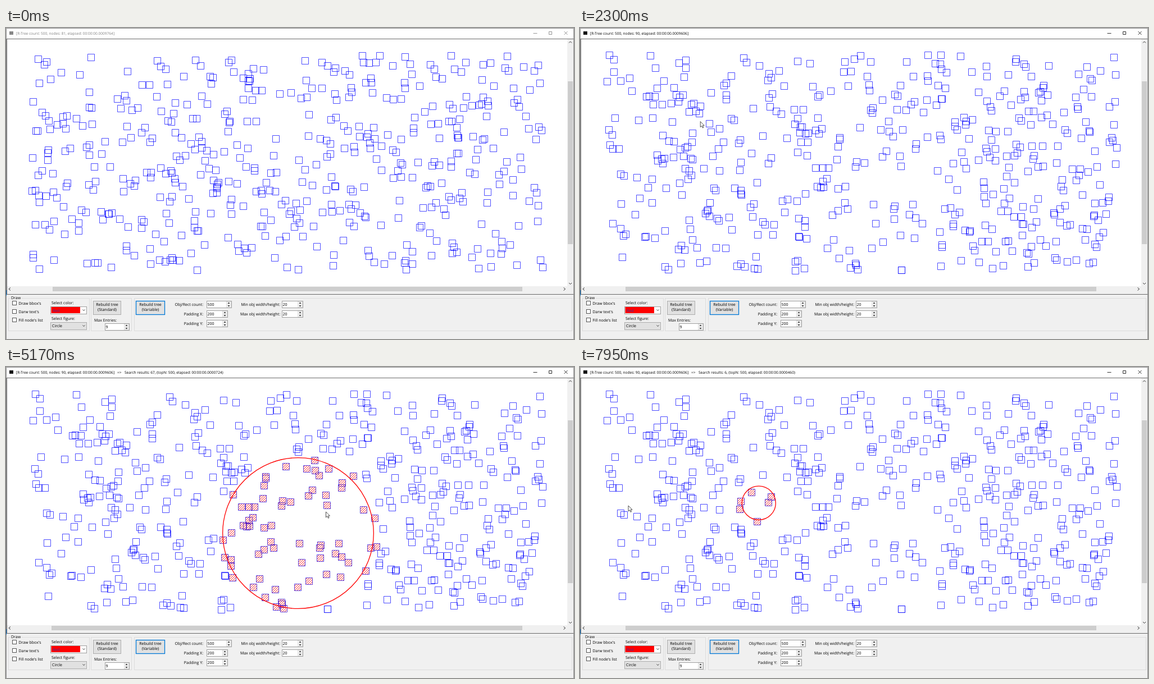
Recreate the animation shown at these times as an HTML page. Size 1011 by 554 pixels, loop 8 s.

```html
<!DOCTYPE html>
<html lang="en">
<head>
<meta charset="utf-8">
<title>R-Tree search</title>
<style>
  html, body { margin: 0; width: 100%; height: 100%; overflow: hidden; background: #f0f0f0; }
  svg { display: block; width: 1011px; height: 554px; }
  text { font: 7px "Open Sans", "Noto Sans", sans-serif; text-rendering: geometricPrecision; white-space: pre; }
  .title text { font-size: 6.57px; }
  .mid { text-anchor: middle; }
  .end { text-anchor: end; }
  .line { fill: none; stroke: #333; }
  .border { fill: none; stroke: #696969; }
  .outer { stroke: #8c8c8c; }
  .check { fill: #fff; stroke: #555; }
  .box { fill: #fff; stroke: #a0a0a0; }
  .group { fill: none; stroke: #dcdcdc; }
  .button { fill: #e1e1e1; stroke: #adadad; }
  #rebuild { stroke: #0078d7; stroke-width: 1.3; }
  .hover #rebuild { fill: #e5f1fb; }
  .off .control text { fill: #a0a0a0; }
  .off .labels text { fill: #666; }
  .off .button, .off #rebuild { fill: #ccc; stroke: #bfbfbf; stroke-width: 1; }
  .off .control .box, .off .check { stroke: #ccc; }
  .inactive { opacity: .5; }
  .squares { fill: none; stroke: #00f; stroke-width: .7; }
  .shape { fill: none; stroke: #f00; stroke-width: 1.3; }
</style>
</head>
<body>
<svg id="stage" viewBox="0 0 1011 554"></svg>
<script>
const LOOP = 8000;
const stage = document.getElementById('stage');

// Interface pieces
const text = (x, y, value, cls = '') => `<text x="${x}" y="${y + 2.6}" class="${cls}">${value}</text>`;
const rect = (x, y, w, h, attrs) => `<rect x="${x}" y="${y}" width="${w}" height="${h}" ${attrs}/>`;
const frame = (x, y, w, h, cls, id = '') => rect(x + .5, y + .5, w, h, `class="${cls}" id="${id}"`);
const path = (d, cls = 'line') => `<path d="${d}" class="${cls}"/>`;
const check = (y, label) => frame(11, y - 4, 7, 7, 'check') + text(22.5, y, label);
const chevron = (x, y) => path(`M${x - 2} ${y - 1}l2 2l2-2`);
const spinner = (x, y, w, value) => frame(x, y, w, 12, 'box') +
  rect(x + w - 8.5, y + 1.5, 8, 10, 'fill="#f0f0f0" stroke="#ccc" stroke-width=".5"') +
  `<path d="M${x + w - 6.5} ${y + 5}h4l-2-2.5zM${x + w - 6.5} ${y + 8}h4l-2 2.5z" fill="#333"/>` +
  text(x + 1.5, y + 6, value);
const field = (right, y, label, x, w, value) => text(right, y + 6, label, 'end') + spinner(x, y, w, value);
const button = (x, y, w, kind, id) => frame(x, y, w, 24, 'button', id) +
  text(x + w / 2 + .5, y + 6.5, 'Rebuild tree', 'mid') + text(x + w / 2 + .5, y + 15.5, `(${kind})`, 'mid');

stage.innerHTML = `
<defs><pattern id="hatch" width="4" height="4" patternUnits="userSpaceOnUse">
  <path d="M-1 1l2-2M0 4l4-4M3 5l2-2" stroke="#f00" stroke-width=".9"/></pattern></defs>
${rect(0, 0, 1011, 554, 'fill="#f0f0f0"')}
${rect(0, 0, 1011, 19, 'fill="#fff"')}
<g id="titleBar">
  ${rect(6, 6, 7, 6, 'fill="#111"')}
  <g id="title"></g>
  ${path('M938.5 9.5h7M966.5 6.5h5v5h-5zM993.5 6l6 6m0-6l-6 6')}
</g>
<rect id="canvas" x="2" y="20" fill="#fff"/>
<g id="scrollbars">
  ${rect(999, 20, 11, 450, 'fill="#f0f0f0"')}${rect(2, 460, 1008, 10, 'fill="#f0f0f0"')}
  ${rect(1000, 95, 9, 290, 'fill="#cdcdcd"')}
  <rect id="thumb" y="461" height="8" fill="#cdcdcd"/>
  ${path('M8 462.5l-3 2.5l3 2.5M992.5 462.5l3 2.5l-3 2.5M1002 26.5l2.5-2.5l2.5 2.5M1002 454l2.5 2.5l2.5-2.5')}
</g>
<path id="squares" class="squares"/>
<path id="hits" fill="url(#hatch)"/>
<circle id="result" class="shape"/>
<circle id="drag" class="shape"/>
<path id="cross" fill="none"/>
${path('M.5 554V.5H1010.5V554', 'border outer')}
${path('M1 19.5H1010M1.5 19V474M1 474.5H1010', 'border')}
${rect(0, 467, 1, 10, 'fill="#0a6cbd"')}
<g class="control">
  ${frame(4, 481, 144, 58, 'group')}${frame(151, 481, 72, 58, 'group')}${frame(228, 481, 779, 58, 'group')}
  ${rect(8, 478, 19, 6, 'fill="#f0f0f0"')}${text(9, 480, 'Draw')}
  ${check(490, 'Draw bbox\'s')}${check(505, 'Darw text\'s')}${check(520, 'Fill node\'s list')}
  ${text(81, 489, 'Select color:')}${text(81, 517, 'Select figure:')}
  ${frame(79, 496, 64, 13, 'box')}${rect(80.5, 497, 51.5, 11, 'fill="#f00"')}
  <text x="83" y="505.5" style="fill:#4030a0">Red</text>${chevron(138.5, 502.5)}
  ${frame(79, 524, 64, 13, 'button')}${text(82, 530.5, 'Circle')}${chevron(138.5, 530.5)}
  ${button(155, 486, 49, 'Standard', 'standard')}${button(231, 486, 51, 'Variable', 'rebuild')}
  ${text(157, 520, 'Max Entries:')}
</g>
<g class="labels">
  ${spinner(176, 526, 43, 9)}
  ${field(351, 486, 'Obj/Rect count:', 357, 44, 500)}
  ${field(351, 503, 'Padding X:', 357, 37, 200)}
  ${field(351, 520, 'Padding Y:', 357, 37, 200)}
  ${field(488, 486, 'Min obj width/height:', 491, 37, 20)}
  ${field(488, 503, 'Max obj width/height:', 491, 37, 20)}
</g>
<g id="cursor">
  <circle id="glow" r="8" cy="2" fill="#ffee38" opacity=".8"/>
  <path d="M0 0V10L2.3 7.8L4 11.4L5.6 10.7L4 7.2H7Z" fill="#fff" stroke="#222" stroke-width=".8"/>
</g>`;

const el = Object.fromEntries([...stage.querySelectorAll('[id]')].map(node => [node.id, node]));
const set = (node, attrs) => { for (const key in attrs) node.setAttribute(key, attrs[key]); };
const show = (node, visible) => { node.style.display = visible ? '' : 'none'; };

// A dragged circle encloses the square whose corner is the press point.
const HALF = 6;
const circleFrom = (x, y, side) => ({ x: x + side / 2, y: y + side / 2, r: side * Math.SQRT1_2 });
const touches = (c, [x, y]) => {
  const gap = d => Math.max(Math.abs(d) - HALF, 0);
  return Math.hypot(gap(x - c.x), gap(y - c.y)) <= c.r;
};
const squarePath = list => list.map(([x, y]) => `M${x - 5.5} ${y - 5.5}h12v12h-12z`).join('');

const searches = [
  { x: 215, y: 177, side: 128, cross: 2510, press: 2710, drawn: 2710, done: 3260, count: 41, time: '0564' },
  { x: 425, y: 201, side: 190, cross: 3930, press: 3930, drawn: 4420, done: 4560, count: 67, time: '0724' },
  { x: 297, y: 221, side: 42.5, cross: 6220, press: 6220, drawn: 6220, done: 6360, count: 6, time: '0460' }
];
for (const s of searches) s.circle = circleFrom(s.x, s.y, s.side);

// Random squares
let seed = 20;
const random = () => (seed = seed * 16807 % 2147483647) / 2147483647;

function scatter(squares, isFull, accept) {
  while (!isFull()) {
    const p = [Math.round(46 + random() * 910), Math.round(48 + random() * 384)];
    if (accept(p)) squares.push(p);
  }
}

const before = [], after = [];
scatter(before, () => before.length === 500, () => true);

// Fill each circle to its result count, smallest first, then the space outside them all.
const filled = [];
const isFree = p => !filled.some(c => touches(c, p));
for (const s of [...searches].sort((a, b) => a.side - b.side)) {
  const inside = p => touches(s.circle, p);
  scatter(after, () => after.filter(inside).length === s.count, p => inside(p) && isFree(p));
  filled.push(s.circle);
}
scatter(after, () => after.length === 500, isFree);

const beforePath = squarePath(before), afterPath = squarePath(after);
for (const s of searches) s.hits = squarePath(after.filter(p => touches(s.circle, p)));

// Pointer moves: start time, end time, destination
const origin = [728, 540];
const moves = [
  [330, 1090, 250, 498], [1300, 1700, 211, 152], [2030, 2510, 215, 170],
  [2710, 3130, 343, 280], [3720, 3930, 425, 201], [3930, 4560, 615, 287],
  [4560, 5170, 570, 258], [5170, 6150, 297, 221], [6220, 6360, 339.5, 262], [6970, 7950, 86, 247]
];
function pointerAt(t) {
  return moves.reduce(([x, y], [from, to, endX, endY]) => {
    const u = Math.min(Math.max((t - from) / (to - from), 0), 1);
    const k = 1 - (1 - u) ** 2;
    return [x + (endX - x) * k, y + (endY - y) * k];
  }, origin);
}

const place = (node, c) => {
  show(node, c);
  if (c) set(node, { cx: c.x, cy: c.y, r: c.r });
};

function draw(t) {
  const cleared = t >= 1330 && t < 1900, rebuilt = t >= 1900;
  const [x, y] = pointerAt(t);
  const found = searches.filter(s => t >= s.done).pop();
  const active = searches.find(s => t >= s.cross && t < s.done);
  const pressed = active && t >= active.press;
  const drawn = active && t >= active.drawn;

  set(stage, { class: cleared ? 'off' : t >= 1000 && t < 1330 ? 'hover' : '' });
  set(el.titleBar, { class: t < 1160 ? 'title inactive' : 'title' });
  set(el.canvas, cleared ? { width: 60, height: 60 } : { width: 998, height: 440 });
  show(el.scrollbars, !cleared);
  set(el.thumb, rebuilt ? { x: 81, width: 838 } : { x: 83, width: 836 });
  set(el.squares, { d: cleared ? '' : rebuilt ? afterPath : beforePath });
  set(el.hits, { d: found ? found.hits : '' });
  place(el.result, found && found.circle);
  place(el.drag, drawn && circleFrom(active.x, active.y, Math.max(x - active.x, y - active.y, 0)));
  set(el.cross, {
    d: active ? `M${active.x - 4} ${active.y + .5}h9M${active.x + .5} ${active.y - 4}v9` : '',
    stroke: drawn ? '#f00' : '#222'
  });

  const size = cleared ? '0, nodes: 1' : `500, nodes: ${rebuilt ? 90 : 81}`;
  let label = text(18, 9, `[R-Tree count: ${size}, elapsed: 00:00:00.000${rebuilt ? 9606 : 9764}]`);
  if (found) label += text(198, 9, '=&gt;') +
    text(211, 9, `Search results: ${found.count}, (topN: 500, elapsed: 00:00:00.000${found.time})`);
  if (draw.label !== label) el.title.innerHTML = draw.label = label;

  show(el.cursor, t >= 330 && !(t >= 2510 && t < 2710));
  set(el.cursor, { transform: `translate(${x} ${y})` });
  show(el.glow, pressed || (t >= 1160 && t < 1300));
}

const start = performance.now();
function tick() {
  draw((performance.now() - start) % LOOP);
  requestAnimationFrame(tick);
}
tick();
</script>
</body>
</html>
```
